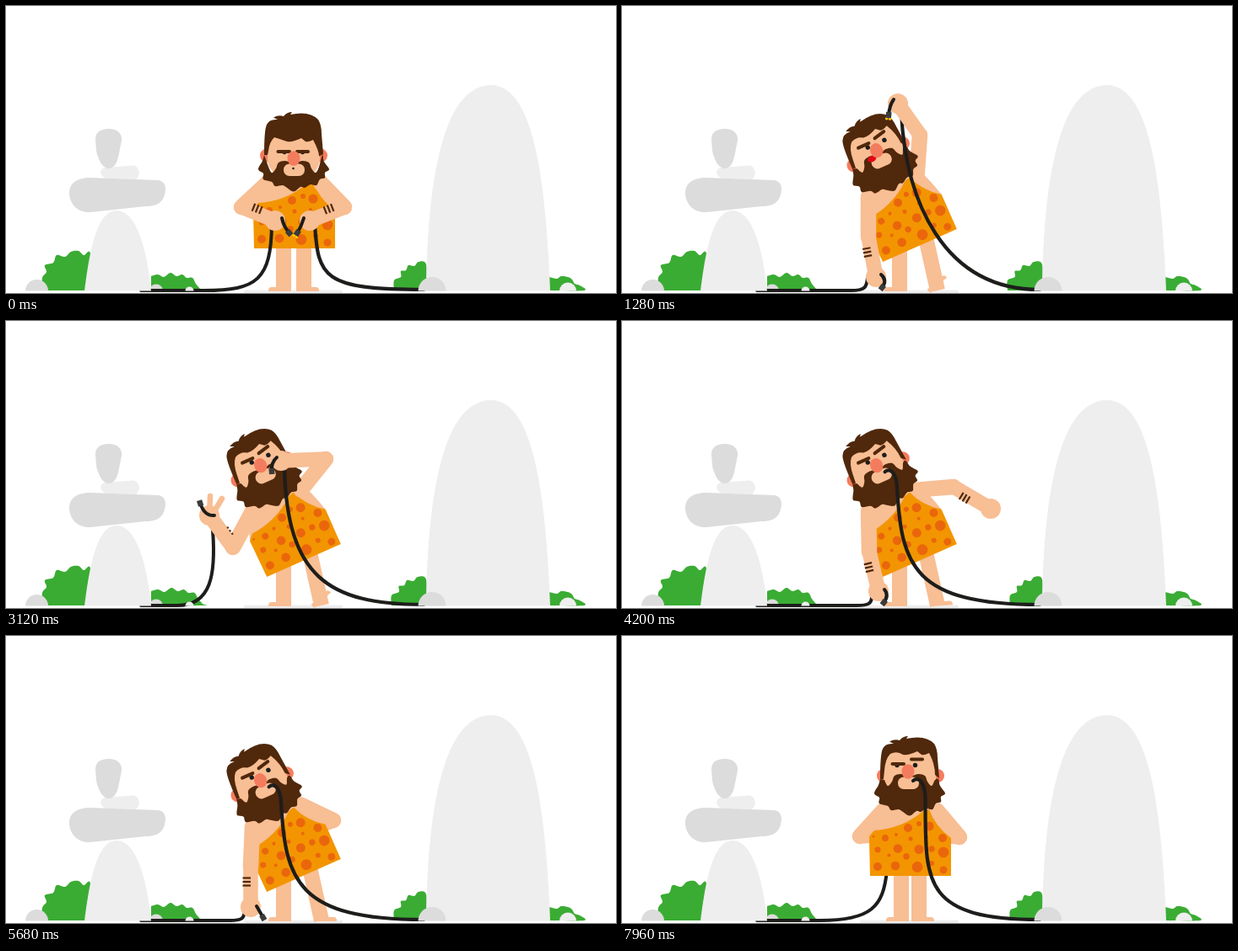
Write an HTML page with a canvas that moves like this. It is 723 px wide and 341 px high and loops after 8 s.

```html
<!DOCTYPE html>
<html lang="en">
<head>
<meta charset="utf-8">
<title>Caveman and cable</title>
<style>
html, body { margin: 0; width: 100%; height: 100%; overflow: hidden; background: #fff; }
canvas { display: block; width: 723px; height: 341px; }
</style>
</head>
<body>
<canvas id="stage" width="723" height="341"></canvas>
<script>
const ctx = document.getElementById('stage').getContext('2d');
const LOOP = 8000, PLUGGED_IN = 3420, RIGHT_BEHIND = 3700, LEFT_BEHIND = 6230;
const SKIN = '#f8be94', HAIR = '#50280b', CORAL = '#f47c5e', TUNIC = '#f39500', SPOT = '#ea660c',
  WIRE = '#1d1d1b', PLUG = '#3b3b3a', GREEN = '#3aac33', PALE = '#eee', GREY = '#dcdcdc';

// Each step: start, end, and the parts that move to a new value.
// body: angle, x, y, head drop, face drop   legs: left x, right hip x, right ankle x, foot angle
// arms: elbow, hand, stripe offset (left arm adds finger spread)
// face: shift, pupil shift, brow heights, right brow tilt, open mouth
const steps = [
  [0, 0, {
    body: [0, 342, 288, 4, 13], legs: [329, 353, 353, 0],
    armL: [279, 239, 319, 255, -10, 0], armR: [401, 239, 360, 255, 0],
    wireL: [235, 298, 314, 325, 315, 260], wireR: [366, 260, 370, 322, 375],
    plugL: [327, 252, 329, 262, 336, 270], plugR: [353, 252, 350, 262, 345, 270],
    face: [0, 2, 153, 153, 0, 0], bush: [1, 1]
  }],
  [120, 720, {
    body: [-24, 353, 284.5, 0, 0], legs: [329, 360, 374, -42],
    armL: [292, 274, 301, 322, 0, 0], armR: [353, 153, 327, 116, 10],
    wireL: [272, 287, 290, 335, 291, 323], wireR: [331, 126, 336, 230, 380],
    plugL: [307, 319, 315, 326, 308, 335], plugR: [322, 111, 317, 118, 316, 130],
    face: [0, 5, 149.5, 145.5, 3, 1], bush: [1, 1.08]
  }],
  [1400, 1750, {
    armR: [379, 164, 326, 166, 10], wireR: [330, 177, 334, 302, 380],
    plugR: [321, 162, 314, 168, 315, 179], face: [0, 5, 149.5, 145.5, 3, 0]
  }],
  [2560, 2960, {
    armL: [269, 269, 241, 231, 8, 1], wireL: [203, 243, 249, 302, 245, 248],
    plugL: [247, 231, 235, 232, 230, 216], bush: [1.05, 1.08]
  }],
  [3400, 3640, {
    armR: [390, 168, 385, 122, 8], wireR: [329, 200, 331, 290, 348],
    legs: [329, 360, 374, -15], bush: [1, 1.04]
  }],
  [3520, 3960, {
    armL: [293, 274, 304, 321, 0, 0], wireL: [278, 292, 296, 336, 296, 327],
    plugL: [311, 319, 317, 326, 310, 335], bush: [1, 1]
  }],
  [3640, 4160, {
    armR: [393, 197, 437, 223, 0], legs: [329, 360, 374, -4], wireR: [329, 200, 331, 290, 345]
  }],
  [4280, 4800, {
    armL: [290, 274, 290, 322, 0, 0], armR: [388, 219, 358, 232, 10], legs: [329, 360, 374, 0],
    wireL: [266, 279, 282, 336, 283, 327], plugL: [297, 321, 300, 326, 305, 335]
  }],
  [5980, 6480, {
    body: [0, 342, 285, 0, 0], legs: [331, 353, 353, 0],
    armL: [282, 238, 318, 236, 10, 0], armR: [400, 239, 364, 236, 10],
    wireL: [235, 295, 310, 322, 314, 278], wireR: [360, 190, 362, 290, 355],
    plugL: [318, 236, 318, 237, 318, 238], face: [0, 0, 151.5, 151.5, 0, 0]
  }],
  [7480, 7720, { legs: [331, 352, 352, 0], face: [-2, 0, 152, 146.5, 0, 0], wireR: [359, 190, 360, 290, 353] }]
];

const spots = [[298, 238, 1.5], [312, 240, 4], [325, 236, 2], [339, 228, 5], [352, 223, 3], [364, 226, 5.5],
  [342, 241, 2.5], [380, 240, 5], [361, 239, 2], [303, 254, 3.5], [327, 252.5, 5.3], [316.5, 260.5, 2],
  [337, 262, 3.7], [352, 253.5, 5.5], [367, 253, 3.7], [381, 257, 6.3], [303, 274, 5], [324, 273, 5.3],
  [350, 274.5, 6.4], [367, 270, 3], [381, 278, 4.5]];

const ease = k => (k = Math.max(0, Math.min(1, k)), k * k * (3 - 2 * k));

function poseAt(t) {
  const pose = { ...steps[0][2] };
  for (const [start, end, parts] of steps.slice(1)) {
    const k = ease((t - start) / (end - start));
    for (const name in parts) pose[name] = pose[name].map((v, i) => v + (parts[name][i] - v) * k);
  }
  return pose;
}

function fill(path, color) {
  ctx.fillStyle = color;
  ctx.fill(new Path2D(path));
}
function stroke(path, color, width, cap = 'round') {
  Object.assign(ctx, { strokeStyle: color, lineWidth: width, lineCap: cap, lineJoin: 'round' });
  ctx.stroke(new Path2D(path));
}
function oval(x, y, rx, ry, color) {
  ctx.beginPath();
  ctx.ellipse(x, y, rx, ry, 0, 0, Math.PI * 2);
  ctx.fillStyle = color;
  ctx.fill();
}
function box(x, y, w, h, r, color) {
  ctx.beginPath();
  ctx.roundRect(x, y, w, h, r);
  ctx.fillStyle = color;
  ctx.fill();
}
const mound = (x, r, color) => fill(`M${x - r},338.5 A${r},${r} 0 0 1 ${x + r},338.5Z`, color);
const dot = (x, y, r, color) => oval(x, y, r, r, color);

// Smooth curve through every point, closed by a straight line.
function curve(points) {
  const at = i => points[Math.max(0, Math.min(points.length - 1, i))];
  let d = 'M' + points[0];
  for (let i = 0; i < points.length - 1; i++) {
    const [a, b, c, e] = [at(i - 1), at(i), at(i + 1), at(i + 2)];
    d += `C${b[0] + (c[0] - a[0]) / 6},${b[1] + (c[1] - a[1]) / 6} ` +
      `${c[0] - (e[0] - b[0]) / 6},${c[1] - (e[1] - b[1]) / 6} ${c}`;
  }
  return d + 'Z';
}
function bush(points, anchor = 0, scale = 1) {
  fill(curve(points.map(([x, y]) => [anchor + (x - anchor) * scale, y])), GREEN);
}

function drawBushes([left, right]) {
  bush([[43, 338], [43, 323], [48, 316], [46, 308], [56, 305], [60, 296], [70, 298], [77, 292], [86, 291],
    [92, 296], [100, 294], [100, 338]]);
  bush([[172, 321], [180, 319], [187, 322], [195, 317], [202, 321], [209, 319], [214, 323], [221, 323],
    [225, 330], [230, 336], [231, 338], [172, 338]], 172, left);
  bush([[460, 338], [460, 326], [468, 322], [468, 315], [474, 314], [477, 308], [484, 309], [489, 304],
    [498, 307], [498, 338]], 498, right);
  bush([[644, 322], [653, 324], [658, 321], [666, 322], [671, 325], [674, 330], [680, 332], [685, 338], [644, 338]]);
  mound(178, 8, GREY);
}

function drawStones() {
  fill('M93,338.5C99,290 108,243 131,243C155,243 167,290 172,338.5Z', PALE);
  fill('M118,192L150,189.5C160,190 160,205 152,206L120,205C110,203 110,193 118,192Z', PALE);
  fill('M75,222C75,210 85,204 100,204L180,207C190,208 190,218 188,224C185,236 175,238 165,238L100,245C85,246 75,235 75,222Z', GREY);
  fill('M106,158C106,148 115,146 122,146C132,146 138,152 137,160L133,180C131,188 127,193 122,193C115,193 110,185 107,172Z', GREY);
  fill('M498,338.5C499,220 515,94 575,94C628,94 640,220 645,338.5Z', PALE);
  mound(36.5, 13.5, GREY);
  mound(505, 16.5, GREY);
  mound(666, 10, PALE);
  mound(217.5, 5, PALE);
}

function drawLegs([left, hip, ankle, angle]) {
  const foot = (x, y, turn, flip) => {
    ctx.save();
    ctx.translate(x, y);
    ctx.rotate(turn * Math.PI / 180);
    ctx.scale(flip, 1);
    box(0, -5, 27, 5, [0, 4, 0, 0], SKIN);
    ctx.restore();
  };
  stroke(`M${left},275V339`, SKIN, 18, 'butt');
  foot(left + 9, 339, 0, -1);
  stroke(`M${hip},275L${ankle},338`, SKIN, 18, 'butt');
  foot(ankle - 9, 339 - angle * 0.04, angle, 1);
}

// Places drawing in the upright body's coordinates, then leans it.
function inBody([angle, x, y], draw) {
  ctx.save();
  ctx.translate(x, y);
  ctx.rotate(angle * Math.PI / 180);
  ctx.translate(-342, -285);
  draw();
  ctx.restore();
}
function bodyPoint([angle, x, y], px, py) {
  const a = angle * Math.PI / 180, dx = px - 342, dy = py - 285;
  return [x + dx * Math.cos(a) - dy * Math.sin(a), y + dx * Math.sin(a) + dy * Math.cos(a)];
}

function drawTorso() {
  fill('M308,196L374,196Q384,215 390,240L390,262H294L293,238Z', SKIN);
  fill('M293,238L299,231Q332,229 357,208L364,206Q371,226 390,240V285H294Z', TUNIC);
  spots.forEach(s => dot(...s, SPOT));
}

function drawHead([, , , headDrop, faceDrop], [shift, pupil, browL, browR, tilt, gasp]) {
  const f = faceDrop, low = points => points.map(([x, y]) => [x, y + f]);
  ctx.save();
  ctx.translate(0, headDrop);
  oval(309 - shift / 2, 166 + f * 0.35, 8, 8, CORAL);
  oval(373 - shift / 2, 166 + f * 0.35, 8, 8, CORAL);
  box(310, 130, 62, 65, 20, SKIN);
  fill(curve([[306, 170], [304, 177], [299, 187], [305, 192], [305, 199], [315, 202], [319, 207], [328, 206],
    [333, 209], [341, 213.5], [349, 208], [354, 209], [361, 205], [368, 206], [372, 199], [378, 197],
    [378, 191], [383, 187], [377, 178], [375, 170],
    ...low([[371, 171], [367, 178], [362, 173], [359, 166], [351, 164], [341, 167], [331, 164], [323, 166],
      [320, 173], [315, 178], [311, 171]])]), HAIR);
  fill(`M306,170Q306,140 309,134Q312,127 322,128L317,125.5Q323,122 329,124Q333,119 339,119L337,122
    Q360,117 370,128Q374,134 374,145L376,169L371,${165 + f / 2}Q371,${152 + f} 364,${139 + f}
    Q358,${142 + f} 355,${141 + f}L350,${137 + f}Q340,${142 + f} 333,${141 + f}Q326,${136 + f * 1.2} 318,${140 + f * 0.7}
    Q312,${146 + f * 0.7} 311,${160 + f * 0.4}L310,170Z`, HAIR);

  ctx.translate(shift, f);
  dot(328 + pupil, 153.5, 2.7, WIRE);
  dot(349.5 + pupil, 153.5, 2.7, WIRE);
  if (browL > 150) box(320, browL - 5, 18, 5, 0, SKIN);
  if (browR > 150) box(343, browR - 5, 18, 5, 0, SKIN);
  stroke(`M322.5,${browL}H336`, HAIR, 4);
  stroke(`M345,${browR + tilt / 2}L358,${browR - tilt / 2}`, HAIR, 4);
  box(329, 167.5, 25, 14.5, 7, SKIN);
  if (gasp > 0.05) oval(332, 168, 5.5 * gasp, 3.5 * gasp, '#e30613');
  if (f > 3) dot(340.5, 173, 1.3, WIRE);
  oval(341, 161, 7.5, 8.7, CORAL);
  ctx.restore();
}

function upperArm(shoulder, [ex, ey]) {
  stroke(`M${shoulder}L${ex},${ey}`, SKIN, 18.5);
}
function forearm([ex, ey, hx, hy, offset, fingers = 0]) {
  stroke(`M${ex},${ey}L${hx},${hy}`, SKIN, 17.5);
  dot(hx, hy, 12, SKIN);
  if (fingers > 0.1) {
    stroke(`M${hx},${hy}L${hx + fingers},${hy - 23 * fingers}`, SKIN, 6.5);
    stroke(`M${hx + 3},${hy}L${hx + 15 * fingers},${hy - 20 * fingers}`, SKIN, 6.5);
  }
  const length = Math.hypot(hx - ex, hy - ey) || 1, ux = (hx - ex) / length, uy = (hy - ey) / length;
  const far = Math.min(offset + 9.5, 10);
  if (far - offset < 0.5) return;
  for (const along of [13.5, 18, 22.5]) {
    const x = ex + ux * along, y = ey + uy * along;
    stroke(`M${x - uy * offset},${y + ux * offset}L${x - uy * far},${y + ux * far}`, HAIR, 2.2, 'butt');
  }
}

function plug([x0, y0, cx, cy, x1, y1], prongs) {
  const length = Math.hypot(x1 - cx, y1 - cy) || 1, ux = (x1 - cx) / length, uy = (y1 - cy) / length;
  if (prongs) for (const side of [-2, 2]) dot(x1 + ux * 4 - uy * side, y1 + uy * 4 + ux * side, 1.7, '#fc0');
  stroke(`M${x0},${y0}Q${cx},${cy} ${x1},${y1}`, WIRE, 4);
  stroke(`M${x1 - ux * 4},${y1 - uy * 4}L${x1 + ux * 3},${y1 + uy * 3}`, PLUG, 6.5, 'butt');
}
function leftWire([ground, c1x, c2x, c2y, x, y]) {
  stroke(`M160,338H${ground}C${c1x},338 ${c2x},${c2y} ${x},${y}`, WIRE, 4);
}
function rightWire([x, y, c1x, c1y, c2x], mouth) {
  let d = `M${x},${y}`;
  if (mouth) {
    const [mx, my] = mouth;
    [x, y] = [mx + 14.5, my + 20];
    d = `M${mx},${my}C${mx + 7},${my - 6} ${mx + 14},${my + 3} ${x},${y}`;
  }
  stroke(`${d}C${c1x},${c1y} ${c2x},337 495,337`, WIRE, 4.2);
}

function draw(t) {
  const p = poseAt(t);
  const shoulderL = bodyPoint(p.body, 310, 207), shoulderR = bodyPoint(p.body, 373, 207);
  const leftBehind = t > LEFT_BEHIND, rightBehind = t > RIGHT_BEHIND, pluggedIn = t > PLUGGED_IN;

  ctx.fillStyle = '#fff';
  ctx.fillRect(0, 0, 723, 341);
  drawBushes(p.bush);
  box(282, 337.5, 117, 3.5, 2, PALE);
  drawLegs(p.legs);

  if (leftBehind) {
    leftWire(p.wireL);
    upperArm(shoulderL, p.armL);
    forearm(p.armL);
  }
  if (rightBehind) {
    upperArm(shoulderR, p.armR);
    forearm(p.armR);
  }
  inBody(p.body, drawTorso);
  if (!leftBehind) {
    leftWire(p.wireL);
    upperArm(shoulderL, p.armL);
  }
  if (!rightBehind) upperArm(shoulderR, p.armR);
  inBody(p.body, () => drawHead(p.body, p.face));

  if (!pluggedIn) rightWire(p.wireR);
  if (!leftBehind) {
    forearm(p.armL);
    plug(p.plugL);
  }
  if (!rightBehind) forearm(p.armR);
  if (pluggedIn) rightWire(p.wireR, bodyPoint(p.body, 347 + p.face[0], 172));
  else plug(p.plugR, t < 1740);
  drawStones();
}

function frame() {
  draw(performance.now() % LOOP);
  requestAnimationFrame(frame);
}
frame();
</script>
</body>
</html>
```
